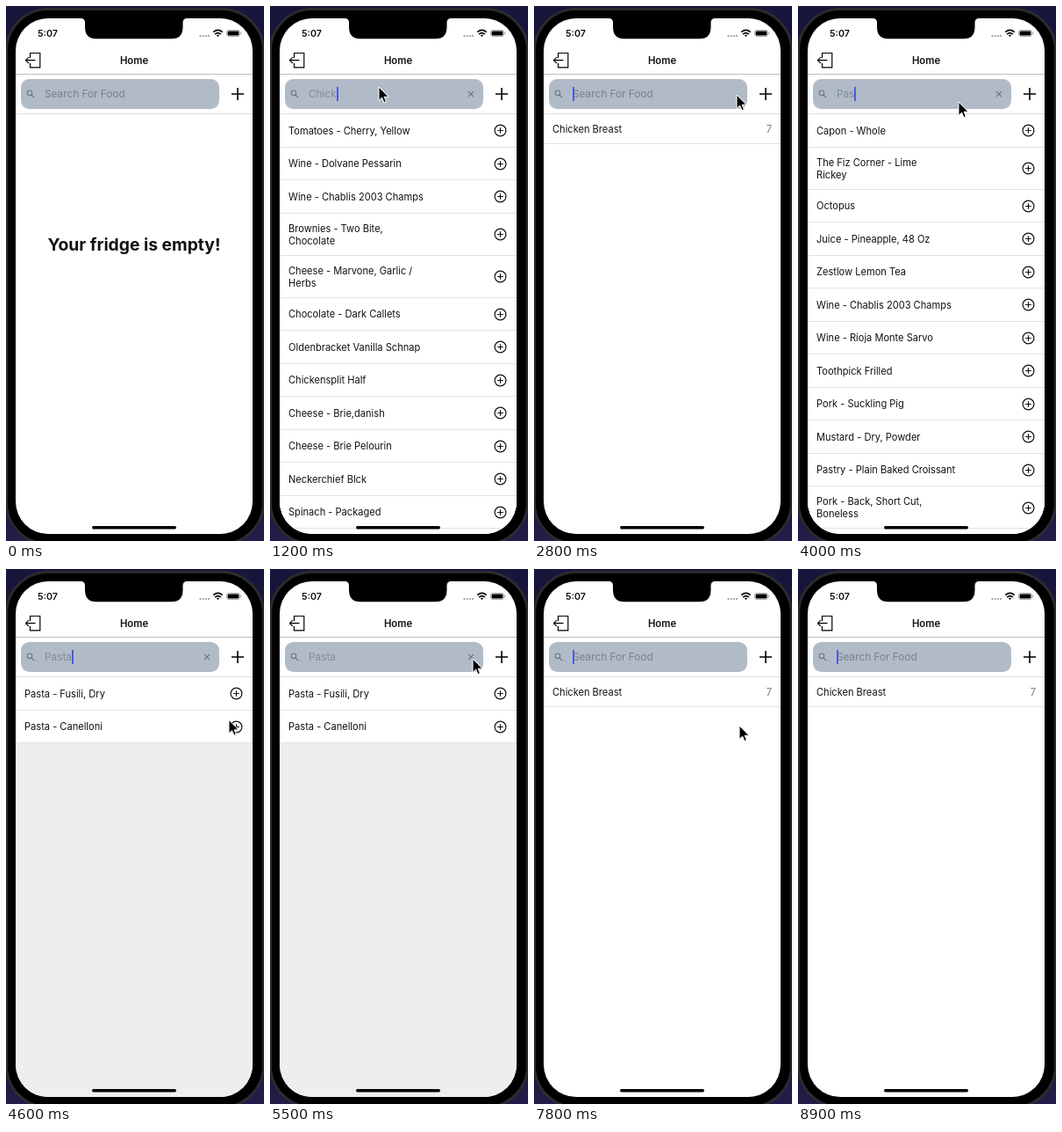
These frames come from a looping animation (294x608 px, 9000 ms). An HTML page:

```html
<!DOCTYPE html>
<html lang="en">
<head>
<meta charset="utf-8">
<title>Fridge app</title>
<style>
html, body { margin: 0; width: 100%; height: 100%; overflow: hidden; }
body {
  position: relative; color: #111;
  background: linear-gradient(#17163c, #0c0b1c 50%, #231c48);
  font: 400 11.08px/14px Inter, "Liberation Sans", sans-serif;
}
body *, .abs { box-sizing: border-box; }
.abs, .view, svg { position: absolute; }
.phone {
  left: -1px; top: 2px; width: 296px; height: 611px;
  border: 3px solid #2b2b2e; border-radius: 49px; background: #000;
}
.screen {
  left: 11px; top: 14px; width: 270px; height: 586px;
  border-radius: 37px; background: #fff; overflow: hidden;
}
.chrome { left: 0; top: 0; }
.time { left: 36px; top: 24.7px; font-size: 10.7px; font-weight: 600; }
.title { left: 11px; width: 270px; top: 55px; text-align: center; font-size: 11.3px; font-weight: 600; }
.search {
  left: 16.5px; top: 83.3px; width: 226.5px; height: 33.5px; padding-left: 27.5px;
  border-radius: 9.5px; background: #b1bbc7; color: #77818e;
  font-size: 11.8px; line-height: 34px; white-space: nowrap;
}
#typed { color: #7f8b9b; }
#typed:not(:empty) ~ .hint, #typed:empty ~ .clear { display: none; }
#caret {
  display: inline-block; width: 2px; height: 16px; margin-right: -2px;
  vertical-align: -4px; background: #4a5be0; animation: blink 9s step-end infinite;
}
.clear { left: 208px; top: 13px; }

/* lists, relative to the screen */
.view { left: 0; top: 109px; width: 270px; height: 477px; animation: 9s step-end infinite; visibility: hidden; }
.foods { background: #eee; }
.full { background: #fff; }
.row {
  position: relative; display: flex; align-items: center; justify-content: space-between;
  height: 37.5px; padding: 0 10px; background: #fff;
  border-bottom: 1px solid #e3e3e3; white-space: pre-line;
}
.row.tall { height: 48px; }
.foods .row { padding-top: 1.4px; }
.row svg { right: 11.5px; top: calc(50% - 7px); }
.stock .row { height: 34px; }
.stock .row b { font-weight: 400; color: #777; }
.empty { top: 0; width: 100%; text-align: center; font: 700 19.3px/24px Inter, "Liberation Sans", sans-serif; }
.v-empty { animation-name: empty; }
.v-chick { animation-name: chick; }
.v-chicken { animation-name: chicken; }
.v-stock { animation-name: stock; }
.v-pas { animation-name: pas; }
.v-pasta { animation-name: pasta; }
.swipe { left: 0; top: 34px; width: 270px; height: 34px; overflow: hidden; visibility: hidden; animation: item 9s step-end infinite; }
.delete {
  right: 0; top: 0; width: 90px; height: 34px; background: #f00; color: #fff;
  font-size: 12px; font-weight: 600; line-height: 34px; text-align: center;
}
.swipe .row { animation: swipe 9s infinite; }
.pointer { left: 0; top: 0; overflow: visible; animation: move 9s ease-in-out infinite, present 9s step-end infinite; }

@keyframes empty { 0% { visibility: visible } 10.56%, 100% { visibility: hidden } }
@keyframes chick { 0%, 15% { visibility: hidden } 10.56% { visibility: visible } }
@keyframes chicken { 0%, 29.44% { visibility: hidden } 15% { visibility: visible } }
@keyframes stock { 0%, 41.67% { visibility: hidden } 29.44%, 61.67%, 100% { visibility: visible } }
@keyframes pas { 0%, 46.11% { visibility: hidden } 41.67% { visibility: visible } }
@keyframes pasta { 0%, 61.67% { visibility: hidden } 46.11% { visibility: visible } }
@keyframes item { 0%, 85%, 100% { visibility: hidden } 61.67% { visibility: visible } }
@keyframes present { 0%, 93.89%, 100% { visibility: hidden } 1.67% { visibility: visible } }
@keyframes swipe {
  0%, 75.5% { transform: none; animation-timing-function: linear }
  77.56%, 78.33% { transform: translateX(-60px) }
  80.56%, 100% { transform: translateX(-90px) }
}
@keyframes move {
  0%, 1.67% { transform: translate(160px, 150px) }
  5%, 17.22% { transform: translate(124px, 92px) }
  19.44%, 26.67% { transform: translate(259px, 138px) }
  29.44%, 31.67% { transform: translate(231px, 101px) }
  36.67%, 48.33% { transform: translate(183px, 109px) }
  51.67%, 56.67% { transform: translate(258px, 175px) }
  59.44%, 63.89% { transform: translate(231px, 102px) }
  72.22%, 75% { transform: translate(260px, 163px); animation-timing-function: linear }
  77.56%, 78.33% { transform: translate(190px, 164px) }
  82.22%, 100% { transform: translate(234px, 178px) }
}
@keyframes blink {
  0%, 8.33%, 17.22%, 21.67%, 26.11%, 32.78%, 37.22%, 48.33%, 52.78%, 57.22%, 63.89%, 68.33%,
  74%, 79.44%, 83.89%, 88.33%, 93%, 96.11% { opacity: 0 }
  6.11%, 10.56%, 19.44%, 23.89%, 29.44%, 35%, 39.44%, 50.56%, 55%, 61.67%, 66.11%, 70.56%,
  76.67%, 81.67%, 86.11%, 90.56%, 93.89%, 98.33%, 100% { opacity: 1 }
}
/* the caret is off just before the text is cleared */
</style>
</head>
<body>
<div class="abs phone"></div>
<div class="abs screen">
  <div class="view v-empty"><div class="abs empty" style="top:136px">Your fridge is empty!</div></div>
  <div class="view foods full v-chick"></div>
  <div class="view foods v-chicken"></div>
  <div class="view stock v-stock">
    <div class="row"><span>Chicken Breast</span><b>7</b></div>
    <div class="abs swipe">
      <div class="abs delete">Delete</div>
      <div class="row"><span>Pasta - Canelloni</span><b>2</b></div>
    </div>
  </div>
  <div class="view foods full v-pas"></div>
  <div class="view foods v-pasta"></div>
</div>

<div class="abs search">
  <span id="typed"></span><i id="caret"></i><span class="hint">Search For Food</span>
  <svg class="clear" width="8" height="8" stroke="#6f7a88" stroke-width="1.1"><path d="M1 1 7 7M7 1 1 7"/></svg>
</div>

<svg class="chrome" width="294" height="608" fill="none" stroke="#000">
  <path d="M11 77.5H281" stroke="#bcbcbc"/>
  <path d="M11 122.5H281" stroke="#dedede"/>
  <path d="M85 13V14Q90 14 90 19V24Q90 37.3 103 37.3H188.5Q201.5 37.3 201.5 24V19Q201.5 14 206.5 14V13Z" fill="#000" stroke="none"/>
  <path d="M27.5 59V53.5H38.8V69.8H27.5V65M33.5 61.7H22.5M26 58.2 22.5 61.7 26 65.2" stroke-width="1.2"/>
  <path d="M264 93V107M257 100H271" stroke-width="1.6"/>
  <g stroke="#6a7583" stroke-width="1.1"><circle cx="27" cy="98.8" r="2.8"/><path d="M29 101 32.5 104.3"/></g>
  <path d="M220.5 34H232" stroke="#aaa" stroke-width="1.8" stroke-dasharray="2 1.2"/>
  <path d="M236.3 29.6Q241.5 25.2 246.7 29.6M238.2 32Q241.5 29.2 244.8 32" stroke-width="1.7"/>
  <path d="M239.8 33.3Q241.5 32 243.2 33.3L241.5 35Z" fill="#000" stroke="none"/>
  <rect x="251.5" y="27.5" width="15" height="7" rx="2.2" stroke="#999" stroke-width=".8"/>
  <rect x="252.6" y="28.6" width="12.8" height="4.8" rx="1.2" fill="#000" stroke="none"/>
  <path d="M268 29.8V32.2" stroke="#999"/>
  <rect x="98" y="591" width="96" height="3.5" rx="1.75" fill="#000" stroke="none"/>
</svg>
<div class="abs time">5:07</div>
<div class="abs title">Home</div>
<svg class="pointer" width="13" height="20"><path d="M0 0V15.5L3.6 12.1 5.9 17.6 8.4 16.5 6.1 11.2H11Z" stroke="#fff" stroke-width="1"/></svg>

<script>
const lists = {
  chick: ["Tomatoes - Cherry, Yellow", "Wine - Dolvane Pessarin", "Wine - Chablis 2003 Champs",
    "Brownies - Two Bite,\nChocolate", "Cheese - Marvone, Garlic /\nHerbs", "Chocolate - Dark Callets",
    "Oldenbracket Vanilla Schnap", "Chickensplit Half", "Cheese - Brie,danish",
    "Cheese - Brie Pelourin", "Neckerchief Blck", "Spinach - Packaged"],
  chicken: ["Chicken Breast", "Chickensplit Half"],
  pas: ["Capon - Whole", "The Fiz Corner - Lime\nRickey", "Octopus", "Juice - Pineapple, 48 Oz",
    "Zestlow Lemon Tea", "Wine - Chablis 2003 Champs", "Wine - Rioja Monte Sarvo",
    "Toothpick Frilled", "Pork - Suckling Pig", "Mustard - Dry, Powder",
    "Pastry - Plain Baked Croissant", "Pork - Back, Short Cut,\nBoneless"],
  pasta: ["Pasta - Fusili, Dry", "Pasta - Canelloni"]
};
const addIcon = `<svg width="15" height="15" fill="none" stroke="#111" stroke-width="1.2">
  <circle cx="7.5" cy="7.5" r="6.4"/><path d="M4.2 7.5H10.8M7.5 4.2V10.8"/></svg>`;
const row = name =>
  `<div class="row${name.includes("\n") ? " tall" : ""}"><span>${name}</span>${addIcon}</div>`;

for (const key in lists)
  document.querySelector(".v-" + key).innerHTML = lists[key].map(row).join("");

// Each entry: word, first key, time per key, time of clearing (ms)
const words = [["Chicken", 950, 56, 2650], ["Pasta", 3750, 100, 5550]];
const typed = document.getElementById("typed");

function textAt(t) {
  const word = words.find(([, from, , to]) => t >= from && t < to);
  return word ? word[0].slice(0, 1 + Math.floor((t - word[1]) / word[2])) : "";
}

let start;
function tick(now) {
  start ??= now;
  const text = textAt((now - start) % 9000);
  if (typed.textContent !== text) typed.textContent = text;
  requestAnimationFrame(tick);
}
requestAnimationFrame(tick);
</script>
</body>
</html>
```
